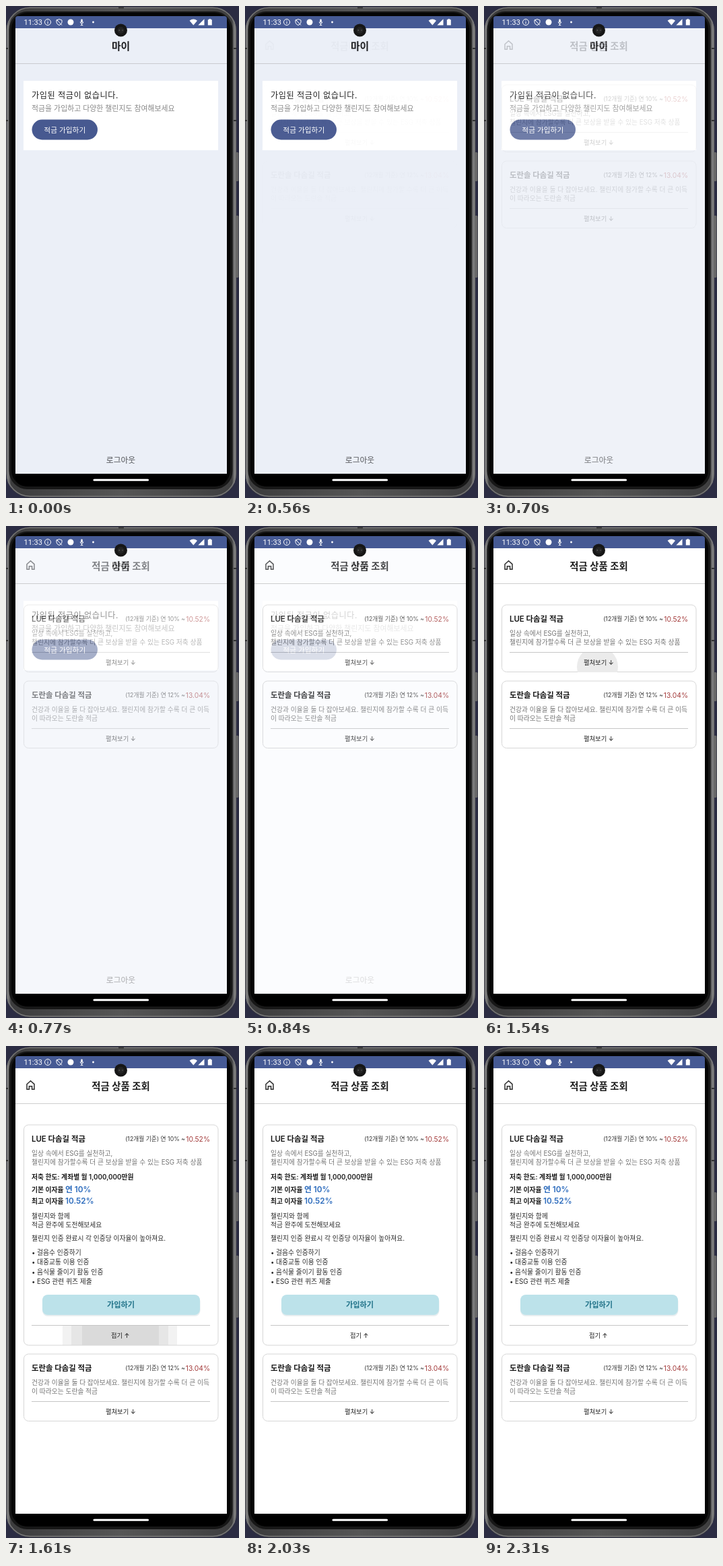
Animation, 346 px wide and 730 px high, one loop 3430 ms. Source, as an HTML page:

```html
<!DOCTYPE html>
<html lang="ko">
<head>
<meta charset="utf-8">
<title>적금 상품 조회</title>
<style>
  html, body { margin: 0; width: 100%; height: 100%; overflow: hidden; background: #2b2c42; }
  svg { display: block; width: 346px; height: 730px; }
  text { font-family: Inter, "Noto Sans CJK KR", "Noto Sans CJK", sans-serif; white-space: pre; }
  #my text { font-family: "Noto Sans CJK KR", "Noto Sans CJK", sans-serif; }
  #clock { font-family: Roboto, sans-serif; }
</style>
</head>
<body>
<svg viewBox="0 0 346 730">
  <defs>
    <linearGradient id="metal" x2="1" y2="0">
      <stop offset="0" stop-color="#4c4c4e"/>
      <stop offset=".008" stop-color="#858585"/>
      <stop offset=".02" stop-color="#3c3c3d"/>
      <stop offset=".5" stop-color="#565656"/>
      <stop offset=".982" stop-color="#3f3f40"/>
      <stop offset=".993" stop-color="#858585"/>
      <stop offset="1" stop-color="#4c4c4e"/>
    </linearGradient>
    <clipPath id="foot1"><rect x="27" y="188" width="288" height="28.5"/></clipPath>
  </defs>

  <g id="phone">
    <rect x="341" y="217" width="4.5" height="43" rx="1.5" fill="#666"/>
    <rect x="341" y="311" width="4.5" height="92" rx="1.5" fill="#666"/>
    <rect x=".5" y="1.5" width="341.5" height="727.5" rx="35" fill="url(#metal)"/>
    <rect x="1.5" y="2.5" width="339.5" height="725" rx="34" fill="none" stroke="#777" stroke-width="1.6"/>
    <rect x="4.5" y="8" width="332" height="709" rx="27" fill="#171717"/>
    <rect x="8" y="10" width="325" height="703" rx="24" fill="#050505"/>
    <path d="M0 63h3M0 170h3M338 63h4M338 170h4M167 2.5h8" stroke="#333" stroke-width="2"/>
    <path d="M14 700V19q0-4 4-4H324q4 0 4 4V700Z" fill="#465a94"/>
  </g>

  <g id="my">
    <rect x="14" y="33" width="314" height="661" fill="#ebeff7"/>
    <path d="M14 85.5H328" stroke="#c9cbd0"/>
    <rect x="26" y="111" width="289" height="103" fill="#fff"/>
    <rect x="38.5" y="168.5" width="97.5" height="30" rx="15" fill="#475990"/>
  </g>

  <g id="shop">
    <rect x="14" y="33" width="314" height="661" fill="#fff"/>
    <path d="M14 85.5H328" stroke="#cfcfcf"/>
    <path d="M31 56.7 36.5 51.8 42 56.7V64.3H38.6V59.8H34.4V64.3H31Z" fill="none" stroke="#2c2c2c" stroke-width="1.5"/>
    <g id="closed">
      <rect x="26.5" y="117" width="288.5" height="99.5" rx="7" fill="#fff" stroke="#d6d6d6"/>
      <circle id="tap" cx="168.5" cy="209" r="30.5" fill="#ebebeb" clip-path="url(#foot1)"/>
      <path d="M38 187.5H303" stroke="#c6c6c6"/>
    </g>
    <g id="open">
      <rect x="26.5" y="117" width="288.5" height="327" rx="7" fill="#fff" stroke="#d6d6d6"/>
      <g id="wave" fill-opacity=".05">
        <rect x="84" y="415" width="170" height="28.5"/>
        <rect x="97" y="415" width="144" height="28.5"/>
        <rect x="113" y="415" width="114" height="28.5"/>
      </g>
      <path d="M38 414.5H303" stroke="#c6c6c6"/>
      <rect x="54" y="371" width="234.5" height="30" rx="8" fill="#e8eef0"/>
      <rect x="54" y="369" width="234" height="30" rx="8" fill="#bce2ea"/>
    </g>
    <g id="first"></g>
    <g id="second">
      <rect x="26.5" y="117" width="288.5" height="99.5" rx="7" fill="#fff" stroke="#d6d6d6"/>
      <path d="M38 187.5H303" stroke="#c6c6c6"/>
    </g>
  </g>

  <g id="system">
    <text id="clock" x="26.5" y="28" font-size="11" fill="#fff">11:33</text>
    <g fill="none" stroke="#fff">
      <circle cx="62" cy="24" r="4.5"/>
      <path d="M62 23.3V26.5M62 21.3v1"/>
      <path d="M79 19.6 83 21V24.2Q82.6 27 79 28.6 75.4 27 75 24.2V21ZM75 20l8 8.5"/>
      <path d="M110.2 23.5q0 2.4 2.3 2.4t2.3-2.4M112.5 25.9V28.5M110.7 28.5h3.6"/>
    </g>
    <g fill="#fff">
      <circle cx="96" cy="24" r="4.5"/>
      <rect x="111.2" y="19.5" width="2.6" height="5" rx="1.3"/>
      <circle cx="129.5" cy="24" r="1.4"/>
      <path d="M272.6 21.7Q278.3 17.3 284 21.7L278.3 28.5Z"/>
      <path d="M294.5 19.3V28.5H285.3Z"/>
      <path d="M301.3 20.2V19.2h3V20.2H305.8V28.6H299.8V20.2Z"/>
    </g>
    <circle cx="170.5" cy="36" r="9.5" fill="#161616"/>
    <circle cx="170.5" cy="36" r="5" fill="#242424"/>
    <circle cx="168.3" cy="36" r="1" fill="#555"/>
    <circle cx="173" cy="36" r="1" fill="#444"/>
    <path d="M14 694H328V700Q326 712.5 310 712.5H32Q16 712.5 14 700Z" fill="#000"/>
    <rect x="129.5" y="701.8" width="82.5" height="3" rx="1.5" fill="#fff"/>
  </g>
</svg>

<script>
const LOOP = 3430;
const $ = id => document.getElementById(id);

// y is the optical middle of the line
function text(parent, x, y, size, str, fill, weight = 400, anchor = 'start', gap = 0) {
  const el = document.createElementNS('http://www.w3.org/2000/svg', 'text');
  const attrs = { x, y: y + size * .37, fill, 'font-size': size, 'font-weight': weight,
                  'text-anchor': anchor, 'letter-spacing': gap };
  for (const k in attrs) el.setAttribute(k, attrs[k]);
  el.textContent = str;
  parent.append(el);
}

function cardText(parent, title, base, rate, lines) {
  text(parent, 38, 138, 11.4, title, '#151515', 600);
  text(parent, 266, 138, 8.75, `(12개월 기준) 연 ${base}% ~`, '#333', 400, 'end');
  text(parent, 303, 138, 10.3, rate, '#a33a3a', 400, 'end');
  lines.forEach((s, i) => text(parent, 38, 159.5 + i * 13, 9.78, s, '#747474'));
}

const my = $('my'), shop = $('shop'), open = $('open');
text(my, 170.5, 60, 14.8, '마이', '#1d1d20', 700, 'middle');
text(my, 38, 132, 12.2, '가입된 적금이 없습니다.', '#222', 400, 'start', .5);
text(my, 38, 152, 10.9, '적금을 가입하고 다양한 챌린지도 참여해보세요', '#888');
text(my, 87.3, 184, 10.7, '적금 가입하기', '#fff', 500, 'middle');
text(my, 170.5, 674, 11.8, '로그아웃', '#505256', 400, 'middle');

text(shop, 170.5, 60, 14.4, '적금 상품 조회', '#1f1f1f', 600, 'middle');
cardText($('first'), 'LUE 다솜길 적금', 10, '10.52%',
  ['일상 속에서 ESG를 실천하고,', '챌린지에 참가할수록 더 큰 보상을 받을 수 있는 ESG 저축 상품']);
cardText($('second'), '도란솔 다솜길 적금', 12, '13.04%',
  ['건강과 이율을 둘 다 잡아보세요. 챌린지에 참가할 수록 더 큰 이득', '이 따라오는 도란솔 적금']);
for (const id of ['closed', 'second']) text($(id), 148, 202.5, 9.3, '펼쳐보기 ↓', '#222', 500);

text(open, 38, 194, 9.8, '저축 한도: 계좌별 월 1,000,000만원', '#1c1c1c', 600);
[['기본 이자율', '연 10%', 213], ['최고 이자율', '10.52%', 230]].forEach(([name, rate, y]) => {
  text(open, 38, y, 9.8, name, '#1c1c1c', 600);
  text(open, 88, y, 11.8, rate, '#2d6cbd', 600);
});
text(open, 38, 252, 9.78, '챌린지와 함께', '#2b2b2b');
text(open, 38, 265, 9.78, '적금 완주에 도전해보세요', '#2b2b2b');
text(open, 38, 285, 9.78, '챌린지 인증 완료시 각 인증당 이자율이 높아져요.', '#2b2b2b');
['걸음수 인증하기', '대중교통 이용 인증', '음식물 줄이기 활동 인증', 'ESG 관련 퀴즈 제출']
  .forEach((s, i) => {
    text(open, 38, 306 + i * 14.5, 9.8, '•', '#2b2b2b');
    text(open, 46, 306 + i * 14.5, 9.8, s, '#2b2b2b');
  });
text(open, 170.5, 384, 11.2, '가입하기', '#23748a', 600, 'middle');
text(open, 156, 430, 9.3, '접기 ↑', '#222', 500);

// Each step [ms, value] holds until the next one
function play(id, prop, steps) {
  const frames = steps.map(([t, v]) => ({ offset: t / LOOP, [prop]: v, easing: 'steps(1, end)' }));
  frames.push({ offset: 1, [prop]: steps[steps.length - 1][1] });
  $(id).animate(frames, { duration: LOOP, iterations: Infinity });
}

play('shop', 'opacity', [[0, 0], [560, .03], [630, .1], [700, .22], [770, .52], [840, .8],
  [910, .9], [980, .95], [1050, .98], [1120, 1]]);
play('tap', 'opacity', [[0, 0], [1540, 1], [1610, 0]]);
play('closed', 'opacity', [[0, 1], [1610, 0]]);
play('open', 'opacity', [[0, 0], [1610, 1]]);
play('wave', 'opacity', [[0, 0], [1610, 1], [1680, 0]]);
play('second', 'transform', [[0, 'translate(0px, 113px)'], [1610, 'translate(0px, 340px)']]);
</script>
</body>
</html>
```
